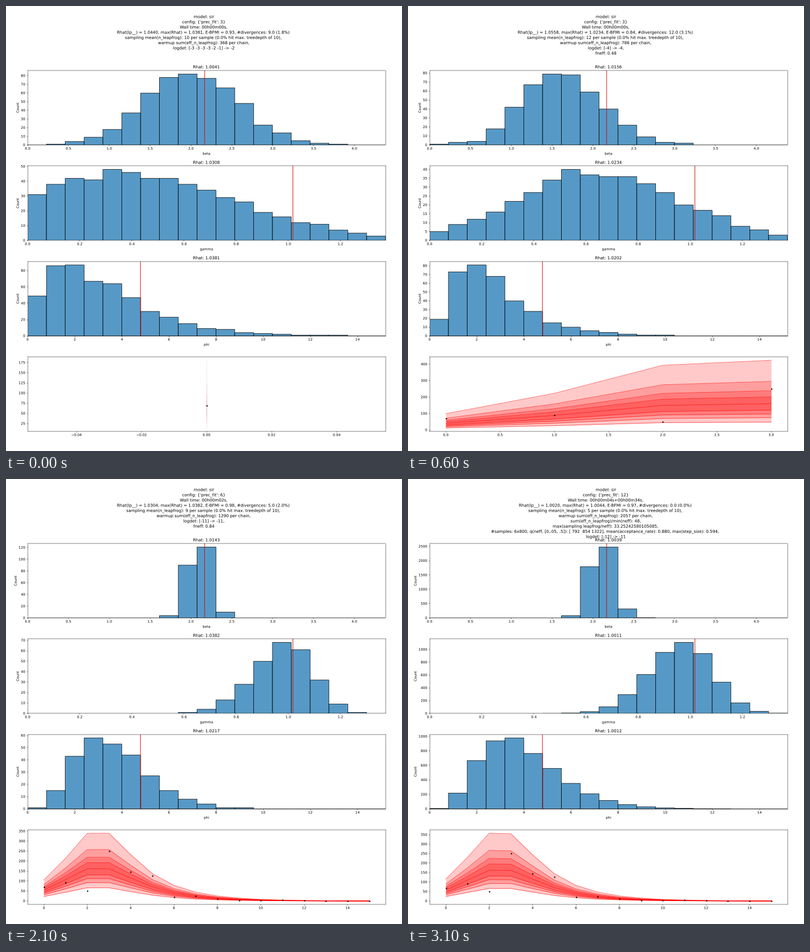
Recreate the animation shown at these times as a matplotlib script. Size 706 by 794 pixels, loop 3600 ms.

```python
import numpy as np
import matplotlib.pyplot as plt
from matplotlib.animation import FuncAnimation
from matplotlib.patheffects import Normal

W, H, DPI = 706, 794, 44.125
AX_H = 133
NBINS = 19
PARAMS = [("beta", 4.381, 2.167), ("gamma", 1.3726, 1.0175), ("phi", 15.19, 4.79)]
CASES = [69, 92, 51, 250, 145, 127, 20, 25, 12, 4, 4, 5, 4, 1, 1, 1]
# normal scores of the 35, 25, 15 and 5 % quantiles, scaled to the outermost
REACH = np.array([0.385, 0.674, 1.036, 1.645]) / 1.645

fig = plt.figure(figsize=(W / DPI, H / DPI), dpi=DPI, facecolor="white")
axes = [fig.add_axes([38.5 / W, 1 - (248 + 170.33 * i) / H, 638 / W, AX_H / H])
        for i in range(4)]


def bell(mode, left, right):
    """Normal curve over the bins with its own width on each side."""
    d = np.arange(NBINS) - mode
    return np.exp(-0.5 * (d / np.where(d < 0, left, right)) ** 2)


def gamma_curve(mode, shape):
    x = (np.arange(NBINS) + 0.5) / mode
    return (x * np.exp(1 - x)) ** shape


def sample(peak, curve, seed):
    """Counts along a curve with sampling scatter; the tallest bin is peak."""
    counts = peak * curve / curve.max()
    noise = np.random.default_rng(seed).normal(size=NBINS)
    counts = np.clip(counts + 0.4 * np.sqrt(counts) * noise, 0, None)
    return np.round(counts * peak / counts.max())


def forecast(n, start, rise, low, high):
    """Nine quantile curves of an epidemic that grows, then dies out."""
    t = np.arange(n)
    mid = 1 / (np.exp(-rise * t) / start + np.exp(0.55 * t) / 1140)
    top = high - 0.3 * (1 - mid / mid.max())
    lower = [mid * low ** r for r in REACH[::-1]]
    upper = [mid * top ** r for r in REACH]
    return np.array(lower + [mid] + upper)


def head(prec, wall, lp, worst, bfmi, div, leap, warm, *rest):
    return ["model: sir",
            f"config: {{'prec_fit': {prec}}}",
            f"Wall time: {wall},",
            f"Rhat(lp__) = {lp:.4f}, max(Rhat) = {worst:.4f}, "
            f"E-BFMI = {bfmi:.2f}, #divergences: {div}",
            f"sampling mean(n_leapfrog): {leap} per sample "
            "(0.0% hit max. treedepth of 10),",
            f"warmup sum(eff_n_leapfrog): {warm} per chain,",
            *rest]


# start in ms, heading, Rhat values, (peak, curve) per histogram, forecast
STAGES = [
    (0, head(3, "00h00m00s", 1.0440, 1.0381, 0.93, "9.0 (1.8%)", 10, 368,
             "logdet: [-3 -3 -3 -3 -2 -1] -> -2"),
     (1.0041, 1.0308, 1.0381),
     [(82, bell(8.3, 2.5, 2.5)), (48, bell(4, 4.5, 6.3)), (87, gamma_curve(2.0, 1.0))],
     forecast(1, 68, 0.7, 0.22, 2.82)),
    (100, head(3, "00h00m00s", 1.0312, 1.0417, 0.89, "10.0 (2.3%)", 11, 612,
               "logdet: [-2] -> -4,", "fneff: 0.52"),
     (1.0127, 1.0265, 1.0417),
     [(80, bell(7.2, 2.3, 2.5)), (44, bell(6, 4.3, 5.5)), (84, gamma_curve(2.1, 1.4))],
     forecast(2, 50, 0.7, 0.32, 2.8)),
    (600, head(3, "00h00m00s", 1.0558, 1.0234, 0.84, "12.0 (3.1%)", 12, 786,
               "logdet: [-4] -> -4,", "fneff: 0.48"),
     (1.0156, 1.0234, 1.0202),
     [(79, bell(6.2, 1.9, 2.4)), (40, bell(8, 4, 4.8)), (81, gamma_curve(2.2, 1.9))],
     forecast(4, 42.5, 0.88, 0.3, 2.65)),
    (1100, head(3, "00h00m01s", 1.0210, 1.0671, 1.24, "6.0 (1.4%)", 13, 909,
                "logdet: [-4] -> -9,", "fneff: 0.24"),
     (1.0526, 1.0088, 1.0671),
     [(158, bell(8.55, 0.93, 1.0)), (103, bell(12.4, 1.9, 1.6)), (121, gamma_curve(2.9, 4.2))],
     forecast(8, 55.6, 0.9, 0.34, 2.09)),
    (1600, head(3, "00h00m01s", 1.0569, 1.0858, 0.96, "2.0 (0.8%)", 8, 943,
                "logdet: [-9] -> -11,", "fneff: 0.59"),
     (1.0858, 1.0471, 1.0354),
     [(124, bell(8.52, 0.57, 0.62)), (65, bell(13.5, 1.9, 1.2)), (62, gamma_curve(3.6, 4.7))],
     forecast(16, 59, 0.79, 0.39, 2.19)),
    (2100, head(6, "00h00m02s", 1.0304, 1.0382, 0.98, "5.0 (2.0%)", 9, 1290,
                "logdet: [-11] -> -11,", "fneff: 0.84"),
     (1.0143, 1.0382, 1.0217),
     [(121, bell(8.55, 0.57, 0.62)), (68, bell(13.4, 1.9, 1.3)), (58, gamma_curve(3.8, 4.6))],
     forecast(16, 58, 0.79, 0.41, 2.1)),
    (2600, head(12, "00h00m04s", 1.0206, 1.0294, 0.99, "8.0 (3.2%)", 9, 1665,
                "logdet: [-11] -> -12,", "fneff: 1.00"),
     (1.0062, 1.0294, 1.0080),
     [(118, bell(8.5, 0.6, 0.73)), (71, bell(13.5, 1.8, 1.2)), (54, gamma_curve(4.1, 4.6))],
     forecast(16, 56, 0.8, 0.43, 1.99)),
    (3100, head(12, "00h00m04s+00h00m34s", 1.0020, 1.0044, 0.97, "0.0 (0.0%)", 5, 2057,
                "sum(eff_n_leapfrog)/min(neff): 48,",
                "max(sampling leapfrog/neff): 33.25242580105085,",
                "#samples: 6x800, q(neff, [0,.05, .5]): [ 792  854 1322], "
                "mean(acceptance_rate): 0.880, max(step_size): 0.594,",
                "logdet: [-12] -> -11"),
     (1.0039, 1.0011, 1.0012),
     [(2480, bell(8.6, 0.6, 0.66)), (1110, bell(13.1, 1.9, 1.5)), (980, gamma_curve(4.0, 4.3))],
     forecast(16, 61, 0.77, 0.41, 2.2)),
]


def draw_hist(ax, param, rhat, counts):
    name, top, truth = param
    width = top / NBINS
    ax.bar(np.arange(NBINS) * width, counts, width, align="edge", snap=False,
           facecolor=(0.122, 0.467, 0.706, 0.75), edgecolor="black", linewidth=1.2)
    ax.axvline(truth, color="#d80000", snap=False)
    ax.set_xlim(0, top)
    ax.set_title(f"Rhat: {rhat:.4f}")
    ax.set_xlabel(name, va="baseline")
    ax.xaxis.set_label_coords(0.5, -17.5 / AX_H)
    ax.set_ylabel("Count")


def draw_fan(ax, fan):
    steps = np.arange(fan.shape[1])
    for low, high in zip(fan[:4], fan[:4:-1]):
        if len(steps) == 1:
            ax.vlines(0, low, high, color="#b06060", alpha=0.3, lw=0.8)
        else:
            ax.fill_between(steps, low, high, color="red", alpha=0.21, linewidth=0)
    if len(steps) > 1:
        ax.plot(steps, fan.T, color="red", alpha=0.6)
    ax.scatter(steps, CASES[:len(steps)], s=16, color="black", linewidths=0, zorder=3)


def draw(frame):
    now = frame * 100
    index = max(i for i, stage in enumerate(STAGES) if stage[0] <= now)
    _, lines, rhats, hists, fan = STAGES[index]
    for text in list(fig.texts):
        text.remove()
    for ax in axes:
        ax.clear()
    for i, line in enumerate(lines):
        fig.text(0.5, 1 - (21.6 + 9.31 * i) / H, line, fontsize=11.95,
                 ha="center", va="baseline")
    for i, (peak, curve) in enumerate(hists):
        draw_hist(axes[i], PARAMS[i], rhats[i], sample(peak, curve, 3 * index + i))
    draw_fan(axes[3], fan)
    # outlined glyphs keep sub-pixel positions at this small size
    labels = list(fig.texts)
    for ax in axes:
        labels += [ax.title, ax.xaxis.label, ax.yaxis.label]
        labels += ax.get_xticklabels() + ax.get_yticklabels()
    for label in labels:
        label.set_path_effects([Normal()])
    return []


anim = FuncAnimation(fig, draw, frames=36, interval=100, repeat=True,
                     repeat_delay=0, cache_frame_data=False)
plt.show()
```
